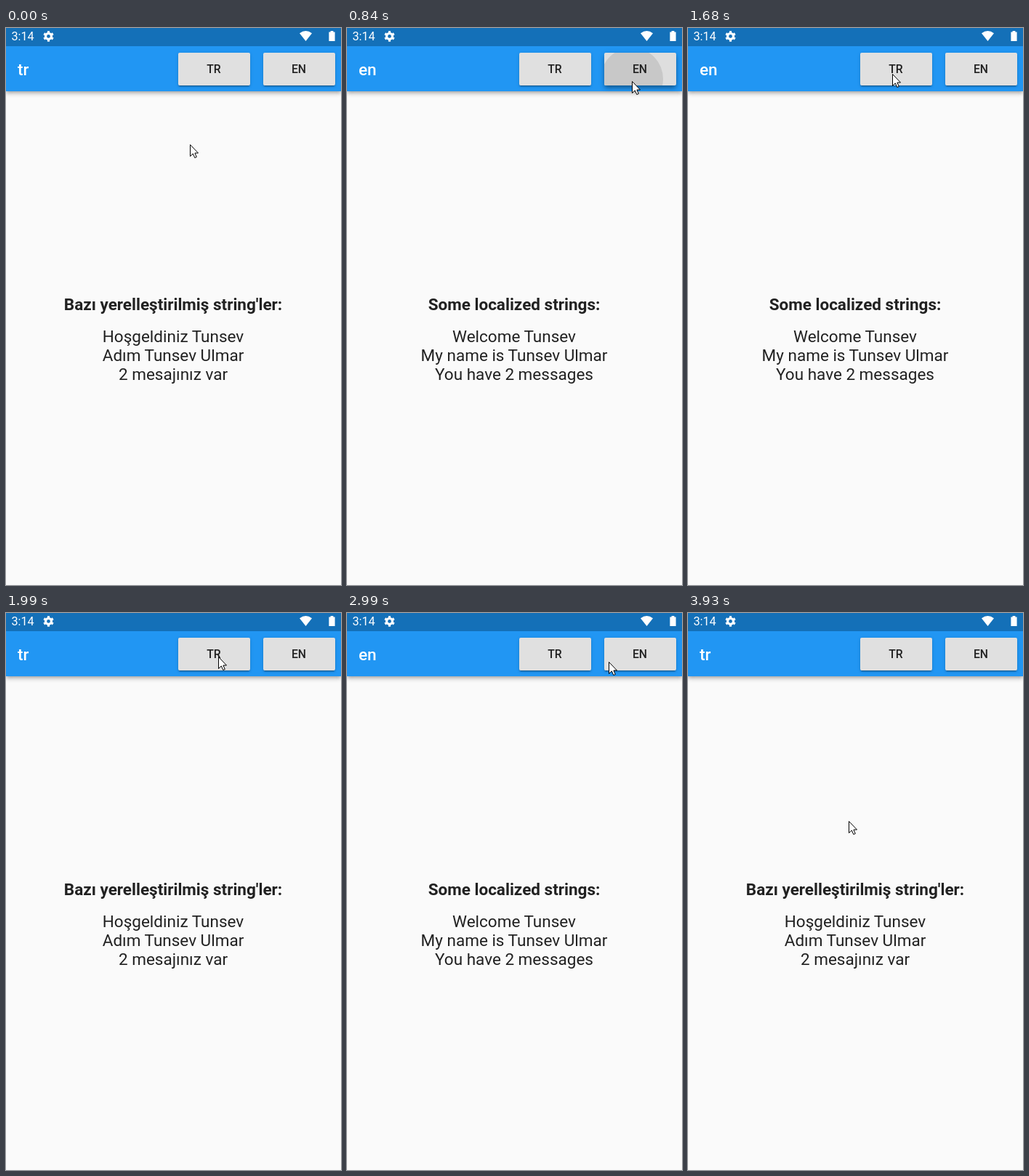
These frames come from a looping animation (461 px wide and 766 px high, 4.08 s). An HTML page:

```html
<!DOCTYPE html>
<html lang="en">
<head>
<meta charset="utf-8">
<title>Localization demo</title>
<style>
  html, body { margin: 0; width: 100%; height: 100%; overflow: hidden; background: #fafafa; }
  body { position: relative; font-family: Roboto, sans-serif; color: #212121; }
  body > * { position: absolute; }
  #status { left: 0; top: 0; width: 461px; height: 24.5px; background: #1470b8; z-index: 2; }
  #bar { left: 0; top: 24px; width: 461px; height: 63px; background: #2196f3;
    box-shadow: 0 2px 4px -1px rgba(0,0,0,.2), 0 4px 5px rgba(0,0,0,.14), 0 1px 9px rgba(0,0,0,.1); }
  #title { left: 16px; top: 44px; font: 500 22.5px/26px Roboto, sans-serif; color: #fff; }
  .btn { top: 33.5px; width: 99px; height: 45px; border-radius: 2px; background: #e0e0e0;
    font: 500 15.75px/45px Roboto, sans-serif; text-align: center; overflow: hidden;
    box-shadow: 0 3px 1px -2px rgba(0,0,0,.2), 0 2px 2px rgba(0,0,0,.14), 0 1px 5px rgba(0,0,0,.12); }
  .btn.up { box-shadow: 0 4px 5px -2px rgba(0,0,0,.2), 0 4px 6px rgba(0,0,0,.18), 0 2px 8px rgba(0,0,0,.14); }
  .btn b { position: relative; font-weight: 500; }
  .btn i { position: absolute; border-radius: 50%; }
  .line { left: 0; width: 460px; text-align: center; white-space: nowrap; font-size: 22.5px; line-height: 26px; }
  #head { top: 367px; font-weight: 700; }
  #cursor { left: 0; top: 0; z-index: 3; }
</style>
</head>
<body>
<div id="bar"></div>
<svg id="status" width="461" height="24.5" fill="#fff">
  <text x="7.4" y="17.2" font-size="16.2" font-family="Roboto, sans-serif">3:14</text>
  <g fill="none" stroke="#fff">
    <circle cx="58.5" cy="11.4" r="4" stroke-width="3.2"/>
    <circle cx="58.5" cy="11.4" r="6" stroke-width="2.6" pathLength="12" stroke-dasharray="1 1" stroke-dashoffset="-.5"/>
  </g>
  <path d="M412.5 18L404 7.2Q412.5 .8 421 7.2Z"/>
  <path d="M446.6 4h3.8v1.5h2.2v12.6h-8.2V5.500h2.200z"/>
</svg>
<div id="title"></div>
<div class="btn" id="tr" style="left:236.5px"><i></i><b>TR</b></div>
<div class="btn" id="en" style="left:353.5px"><i></i><b>EN</b></div>
<div class="line" id="head"></div>
<div class="line" style="top:411px"></div>
<div class="line" style="top:437px"></div>
<div class="line" style="top:462.500px"></div>
<svg id="cursor" width="13" height="20">
  <path d="M.5.5V16.5L4.300 12.900 6.800 18.500 9.300 17.400 6.900 12H11.500Z" fill="#fff" stroke="#000" stroke-linejoin="round"/>
</svg>
<script>
const LOOP = 4080, TICK = 76.67;
const TEXT = {
  tr: ["Bazı yerelleştirilmiş string'ler:", 'Hoşgeldiniz Tunsev', 'Adım Tunsev Ulmar', '2 mesajınız var'],
  en: ['Some localized strings:', 'Welcome Tunsev', 'My name is Tunsev Ulmar', 'You have 2 messages']
};
// Pointer stops: tick, x, y
const PATH = [
  [0, 253, 160], [7, 391, 73], [8, 391, 73], [9, 392, 73], [13, 392, 73],
  [20, 300, 70], [22, 281, 63], [25, 282, 63], [27, 301, 57], [29, 345, 54],
  [32, 414, 66], [34, 415, 69], [35, 414, 68], [37, 414, 68], [38, 402, 67],
  [39, 360, 67], [41, 319, 66], [43, 306, 64], [46, 305, 64], [47, 301, 82],
  [48, 255, 224], [49, 222, 286], [50, 222, 286], [51, 221, 286]
];
// Ticks at which a button is pressed; the language follows one tick later
const CLICKS = [[10, 'en', 392, 70], [24, 'tr', 281, 62], [36, 'en', 413, 66], [46, 'tr', 304, 62]];

const $ = id => document.getElementById(id);
const lines = document.querySelectorAll('.line');

function pointer(n) {
  const k = PATH.findIndex(p => p[0] > n);
  if (k < 0) return PATH[PATH.length - 1].slice(1);
  const a = PATH[k - 1], b = PATH[k];
  let u = (n - a[0]) / (b[0] - a[0]);
  if (b[0] - a[0] > 4) u = u * u * (3 - 2 * u);
  return [1, 2].map(j => Math.round(a[j] + (b[j] - a[j]) * u));
}

function paintButton(id, n) {
  const el = $(id), dot = el.firstChild;
  const click = CLICKS.find(c => c[1] === id && (n === c[0] || n === c[0] + 1));
  el.classList.toggle('up', !!click);
  el.style.background = '#e0e0e0';
  dot.style.display = click ? 'block' : 'none';
  if (!click) return;
  const large = n > click[0], r = large ? 43 : 4;
  const left = id === 'tr' ? 236.5 : 353.5;
  el.style.background = large ? '#dedede' : '#d5d5d5';
  dot.style.background = large ? '#c8c8c8' : '#bdbdbd';
  dot.style.width = dot.style.height = 2 * r + 'px';
  dot.style.left = click[2] - left - r + 'px';
  dot.style.top = click[3] - 33.5 - r + 'px';
}

function draw(t) {
  const n = Math.floor((t % LOOP + 8) / TICK);
  let lang = 'tr';
  for (const c of CLICKS) if (n > c[0]) lang = c[1];
  $('title').textContent = lang;
  lines.forEach((el, i) => { el.textContent = TEXT[lang][i]; });
  paintButton('tr', n);
  paintButton('en', n);
  const [x, y] = pointer(n);
  $('cursor').style.transform = `translate(${x}px,${y}px)`;
}

const start = performance.now();
function loop(now) {
  draw(Math.max(0, now - start));
  requestAnimationFrame(loop);
}
draw(0);
requestAnimationFrame(loop);
</script>
</body>
</html>
```
